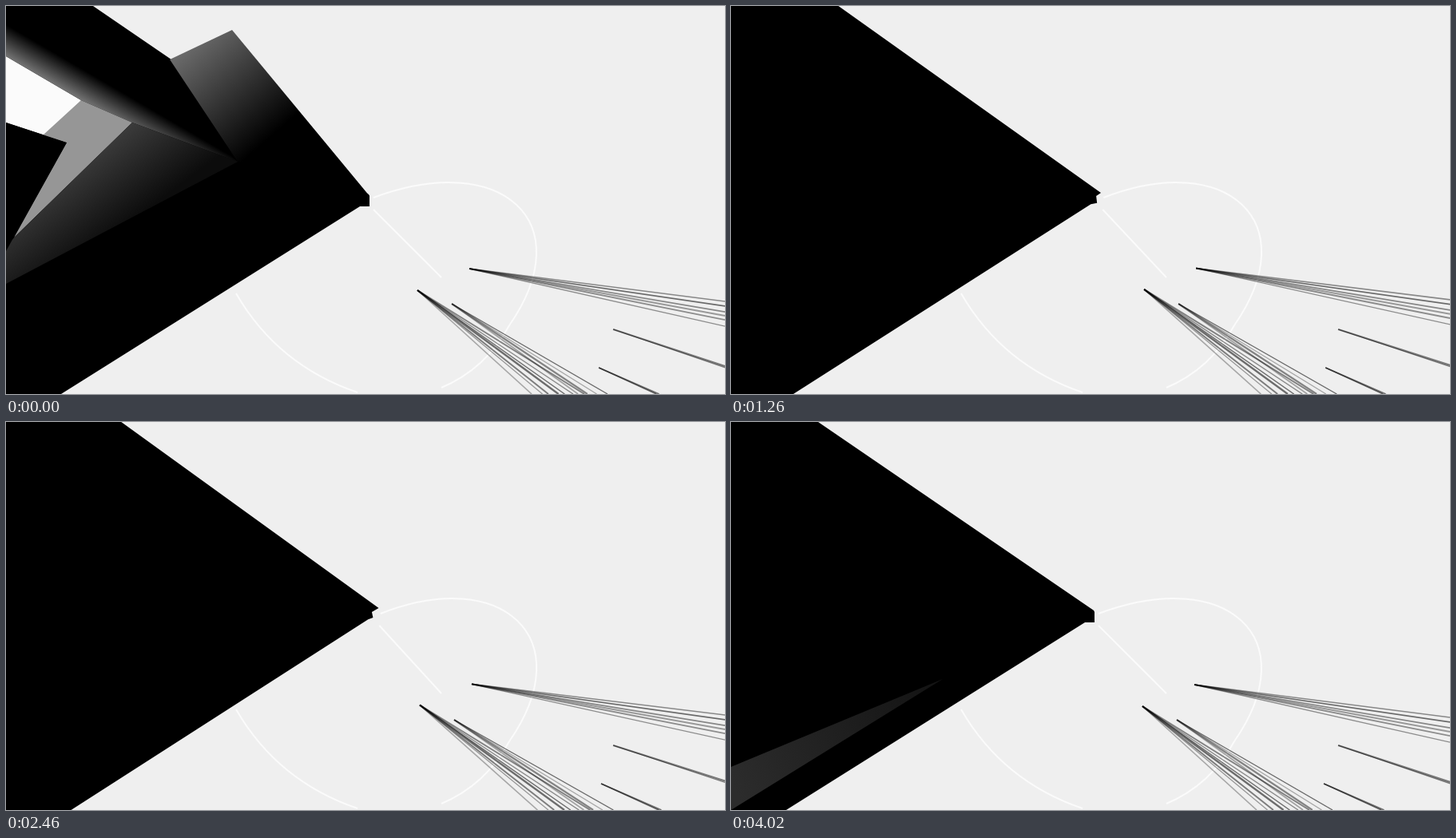
An HTML page with a canvas that plays this animation: 900x486 px, repeating every 4050 ms.

```html
<!DOCTYPE html>
<html lang="en">
<head>
<meta charset="utf-8">
<title>Shard and light</title>
<style>
html, body { margin: 0; width: 100%; height: 100%; overflow: hidden; background: #efefef; }
canvas { display: block; width: 900px; height: 486px; }
</style>
</head>
<body>
<canvas id="stage" width="900" height="486"></canvas>
<script>
const ctx = document.getElementById('stage').getContext('2d');
const W = 900, H = 486, STEP = 30, COUNT = 135;
const PAPER = '#efefef', WHITE = '#fbfbfb';

// Key points of the lit interior.
const rim = [0, 63], corner = [94, 118], bend = [158, 146];
const sill = [0, 146], foot = [76, 171];

const mix = (a, b, k) => a + (b - a) * k;
const clamp = v => Math.max(0, Math.min(1, v));

function seeded(seed) {
  return () => (seed = seed * 16807 % 2147483647) / 2147483647;
}

function poly(fill, ...points) {
  ctx.beginPath();
  for (const p of points) ctx.lineTo(...p);
  ctx.closePath();
  ctx.fillStyle = fill;
  ctx.fill();
}

function fade(a, from, b, to) {
  const g = ctx.createLinearGradient(...a, ...b);
  g.addColorStop(0, from);
  g.addColorStop(1, to);
  return g;
}

function contours(drift) {
  ctx.strokeStyle = WHITE;
  ctx.lineWidth = 2;
  ctx.beginPath();
  ctx.moveTo(460 + 12 * drift, 240);
  ctx.bezierCurveTo(620, 180, 720, 270, 630, 400);
  ctx.quadraticCurveTo(600, 455, 545, 478);
  ctx.moveTo(460 + 10 * drift, 255);
  ctx.lineTo(545, 340);
  ctx.moveTo(288, 360);
  ctx.quadraticCurveTo(340, 450, 440, 484);
  ctx.stroke();
}

// Thin hairs sharing one root; they overlap into a dark stem.
function fan(root, first, last, count, seed) {
  const random = seeded(seed);
  for (let i = 0; i < count; i++) {
    const k = (i + random() * .6) / (count - .7);
    ctx.strokeStyle = `rgba(0,0,0,${mix(.3, .6, random())})`;
    ctx.lineWidth = mix(1.2, 2.4, random());
    ctx.beginPath();
    ctx.moveTo(...root);
    ctx.lineTo(mix(first[0], last[0], k), mix(first[1], last[1], k));
    ctx.stroke();
  }
}

function streaks(drift) {
  const lift = 4 * drift, shift = 10 * drift;
  fan([580 + lift, 329 - drift], [W, 370 - lift], [W, 400 - lift], 6, 11);
  fan([760, 405], [W, 451 - lift / 2], [W, 453 - lift / 2], 2, 5);
  fan([742 + lift, 453], [814 + lift, H], [818 + lift, H], 2, 7);
  fan([515 + lift, 356 - lift / 2], [658 + shift, H], [722 + shift, H], 7, 23);
  fan([558 + lift, 373], [716 + shift, H], [750 + shift, H], 4, 31);
}

function shard(drift, swing) {
  const tip = [454 + 17 * drift, 236 - 4 * drift];
  const top = [[0, 0], [109 + 48 * drift, 0], tip];
  const notch = [455 + 4 * drift, 238];
  if (swing > 0) {
    const angle = mix(Math.atan2(240, -385), Math.atan2(246, 325), swing);
    const far = [455 + W * Math.cos(angle), 240 + W * Math.sin(angle)];
    poly('#000', ...top, [455, 240], far, [0, W]);
  }
  poly('#000', ...top, notch, [notch[0] + 2 * drift, mix(251, 243, drift)],
    [mix(443, 457, drift), mix(251, 246, drift)], [69 + 17 * drift, H], [0, H]);
}

// The window on the left and the soft beam above it.
function beam(tail) {
  poly(WHITE, rim, corner, foot, sill);
  poly(fade([5, 26], '#000', [-16, 62], '#8c8c8c'), [0, 0], [60, 0], tail, bend, corner, rim);
}

function openLight() {
  const tail = [290, 195], peak = [283, 30], tip = [455, 238];
  const crossing = [205, 67], low = [10, 290];
  poly(fade([230, 50], '#6a6a6a', [330, 165], '#000'), crossing, peak, tip, tail);
  beam(tail);
  poly('#969696', corner, bend, low, foot, [46, 162]);
  poly(fade([70, 210], '#3c3c3c', [130, 290], '#0c0c0c'), bend, tail, [0, 348], [0, 300]);
  poly('#000', sill, foot, [0, 307]);
}

function narrowLight() {
  const tail = [330, 192];
  beam(tail);
  poly(fade(corner, '#666', bend, '#333'), corner, bend, foot);
  poly('#222', [205, 198], [270, 218], [60, 363]);
  poly(fade(tail, '#111', [455, 238], '#999'), tail, [457, 235], [452, 239]);
  ctx.strokeStyle = '#111';
  ctx.lineWidth = 4;
  ctx.beginPath();
  ctx.moveTo(98, 119);
  ctx.lineTo(86, 167);
  ctx.stroke();
}

function lowGlow(drop) {
  poly(fade([0, 450], '#2c2c2c', [250, 330], '#141414'),
    [0, 432 + drop], [265, 322 + drop], [0, H + drop]);
}

function sparkle(size) {
  const star = Array.from({ length: 8 }, (_, i) => {
    const r = i % 2 ? size / 6 : size / 2, a = i * Math.PI / 4;
    return [74 + r * Math.cos(a), 386 + r * Math.sin(a)];
  });
  poly('#999', ...star);
}

// The loop runs forward and then back over the same poses.
function draw(time) {
  const index = Math.floor(time / STEP) % COUNT;
  const pose = Math.min(index, COUNT - index);
  const drift = Math.pow(pose / 66, 1.4);
  const swing = clamp(1 - Math.abs(pose - 24) / 3);

  ctx.fillStyle = PAPER;
  ctx.fillRect(0, 0, W, H);
  contours(drift);
  streaks(drift);
  shard(drift, swing);

  if (pose === 0) openLight();
  else if (pose < 3) lowGlow((pose - 1) * 70);
  if (swing > 0) {
    ctx.globalAlpha = swing * swing;
    narrowLight();
    ctx.globalAlpha = 1;
  }
  if (pose > 62) sparkle(Math.min(24, (pose - 61) * 6));
}

const start = performance.now();
function tick() {
  draw(performance.now() - start);
  requestAnimationFrame(tick);
}
tick();
</script>
</body>
</html>
```
